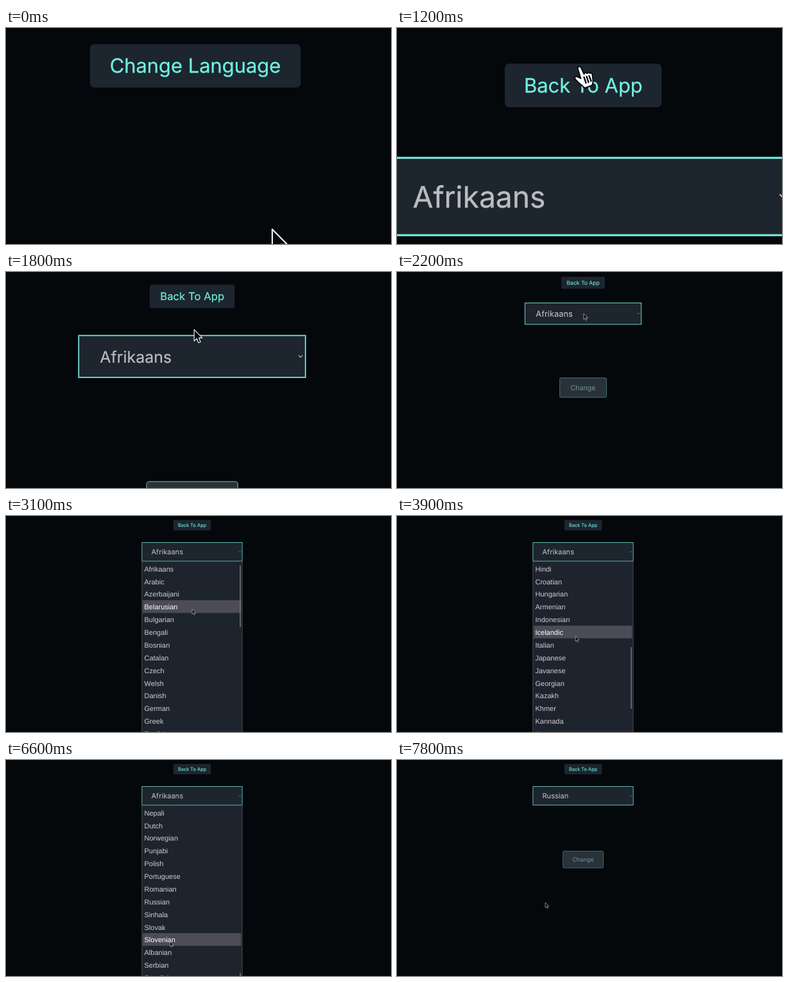
An HTML page for the animation above (7900 ms loop, 600 by 338 pixels).

```html
<!DOCTYPE html>
<html lang="en">
<head>
<meta charset="utf-8">
<title>Language picker</title>
<style>
html, body { margin: 0; width: 100%; height: 100%; overflow: hidden; background: #05080b; }
svg { display: block; width: 600px; height: 338px; background: #05080b; }
text { font-family: Inter, sans-serif; text-rendering: geometricPrecision; }
.btn rect { fill: #1d252f; }
.btn text { font-size: 7.4px; fill: #70f0e0; stroke: #70f0e0; stroke-width: .07; text-anchor: middle; }
.field rect { fill: #1d252f; stroke: #78ecde; stroke-width: .76; }
.field text { font-size: 11.05px; fill: #babcbe; stroke: #babcbe; stroke-width: .09; }
.field path { fill: none; stroke: #c0c3c6; stroke-width: .5; }
.submit rect { fill: #28323a; stroke: #568583; stroke-width: .7; }
.submit text { font-size: 9.2px; fill: #72908f; text-anchor: middle; }
#list text { font: 11px "Liberation Sans", Arial, sans-serif; fill: #cbcdd0; }
#list text.on { fill: #fff; }
</style>
</head>
<body>
<svg viewBox="0 0 600 338">
  <g id="cam">
    <g id="home" class="btn">
      <rect x="251.9" y="6.3" width="78.6" height="16.3" rx="1.7"/>
      <text x="291.2" y="17">Change Language</text>
    </g>
    <g id="page">
      <g class="btn">
        <rect x="260.8" y="6.3" width="58.5" height="16.3" rx="1.7"/>
        <text x="290.1" y="17.2">Back To App</text>
      </g>
      <g class="field">
        <rect x="211.9" y="41.55" width="156.2" height="28.95"/>
        <text id="value" x="226.5" y="60.25"></text>
        <path d="M363.3 55.2l1.4 1.4 1.4-1.4"/>
      </g>
      <g class="submit">
        <rect x="258.7" y="142.6" width="62.8" height="26.3" rx="1.8"/>
        <text x="290" y="159.2">Change</text>
      </g>
    </g>
  </g>
  <g id="list">
    <rect x="211.8" y="71" width="156.3" height="300" fill="#1e242e" stroke="#505459" stroke-width=".8"/>
    <rect id="mark" x="213" width="153.4" height="19.87" fill="#4b4c57"/>
    <rect id="thumb" x="364.3" width="1.6" height="97" rx=".8" fill="#70747a"/>
  </g>
  <g id="cursor">
    <path id="arrow" d="M.1.1V8L1.9 6.3 3.1 9.2 4.5 8.6 3.3 5.8H5.7Z" fill="#07090c" stroke="#f4f4f4" stroke-width=".5" stroke-linejoin="round"/>
    <g id="hand" transform="scale(.239)" stroke="#080a0d" stroke-width="2" stroke-linejoin="round" stroke-linecap="round">
      <path fill="#fff" d="M-3 3Q-2 -1 2 1L7 12Q9 8 12 11Q14 8 16 11Q19 9 20 13L21 22Q21 28 19 30L8 34Q3 29 -1 26L-7 20Q-8 15 -4 16Q-1 17 2 19Z"/>
      <path fill="none" stroke-width="2.4" d="M7 17l3 9M11 16l3 9M15 15l3 8"/>
    </g>
  </g>
</svg>
<script>
const LOOP = 7900, STEP = 100, ROW = 19.87, TOP = 72.6, ZOOM = 4.18;
const OPEN = 2500, CLOSE = 7800, PAGE = 25;

const langs = ("Afrikaans Arabic Azerbaijani Belarusian Bulgarian Bengali Bosnian Catalan Czech Welsh " +
  "Danish German Greek English Spanish Estonian Basque Persian Finnish Filipino French Irish Galician " +
  "Gujarati Hebrew Hindi Croatian Hungarian Armenian Indonesian Icelandic Italian Japanese Javanese " +
  "Georgian Kazakh Khmer Kannada Korean Kyrgyz Lao Lithuanian Latvian Macedonian Malayalam Mongolian " +
  "Marathi Malay Maltese Burmese Nepali Dutch Norwegian Punjabi Polish Portuguese Romanian Russian " +
  "Sinhala Slovak Slovenian Albanian Serbian Swedish Swahili Tamil Telugu Thai").split(" ");

// pointer moves, each eased from where the last one ended
const glides = [
  { from: 0, to: 500, x: 284.5, y: 60 },       // to the button
  { from: 1200, to: 1800, x: 293, y: 90 },     // off the button
  { from: 1800, to: 2400, x: 290, y: 56 },     // onto the field
  { from: 2500, to: 3400, x: 290, y: 177 },    // down the list
  { from: 3400, to: 3800, x: 278, y: 188 },
  { from: 4100, to: 4200, x: 276.7, y: 191.6 },
  { from: 5500, to: 6100, x: 264, y: 305 },    // past the choice
  { from: 6200, to: 7400, x: 231, y: 223 }     // back to it
];

const $ = id => document.getElementById(id);
const show = (id, on) => $(id).setAttribute("display", on ? "inline" : "none");
const progress = (t, from, to) => Math.min(1, Math.max(0, (t - from) / (to - from)));
const smooth = p => p * p * (3 - 2 * p);

function pointerAt(t) {
  let x = 414.5, y = 314.5;
  for (const g of glides) {
    const p = smooth(progress(t, g.from, g.to));
    x += (g.x - x) * p;
    y += (g.y - y) * p;
  }
  return [x, y];
}

// two flicks of the wheel, snapped to whole rows
const firstRow = t => Math.round(PAGE *
  (smooth(progress(t, 3300, 3900)) + smooth(progress(t, 4600, 5300))));

// 1 = close up, 0 = whole page; starts fast and settles slowly
const closeness = t => 1 - smooth(1 - (1 - progress(t, 1200, 2500)) ** 1.36);

const rows = Array.from({ length: 14 }, (_, i) => {
  const el = document.createElementNS("http://www.w3.org/2000/svg", "text");
  el.setAttribute("x", 215.5);
  el.setAttribute("y", TOP + i * ROW + 14.1);
  $("list").insertBefore(el, $("thumb"));
  return el;
});

function drawList(t, y) {
  const first = firstRow(t);
  let active = first + Math.max(0, Math.floor((y - TOP) / ROW));
  // a scrolled list keeps its active row until the pointer moves again
  if (t < 5600) active = Math.min(active, 2 * PAGE);
  $("mark").setAttribute("y", TOP + (active - first) * ROW - .4);
  $("thumb").setAttribute("y", 77 + first * 5.12);
  rows.forEach((el, i) => {
    el.textContent = langs[first + i] || "";
    el.classList.toggle("on", first + i === active);
  });
}

function draw(t) {
  const near = closeness(t), zoom = 1 + (ZOOM - 1) * near;
  const atHome = t < 1000, open = t >= OPEN && t < CLOSE;
  const shift = atHome ? -1.2 : 29.5 * near ** 1.84;
  const [x, y] = pointerAt(t);
  const hand = t >= 400 && t < 1500;

  $("cam").setAttribute("transform", `translate(${290 - 290 * zoom} ${shift}) scale(${zoom})`);
  $("cursor").setAttribute("transform", `translate(${x} ${y}) scale(${zoom})`);
  $("value").textContent = t < CLOSE ? "Afrikaans" : "Russian";
  show("home", atHome);
  show("page", !atHome);
  show("list", open);
  show("hand", hand);
  show("arrow", !hand);
  if (open) drawList(t, y);
}

const start = performance.now();
function tick() {
  const t = (performance.now() - start) % LOOP;
  draw(Math.floor(t / STEP) * STEP);
  requestAnimationFrame(tick);
}
tick();
</script>
</body>
</html>
```
